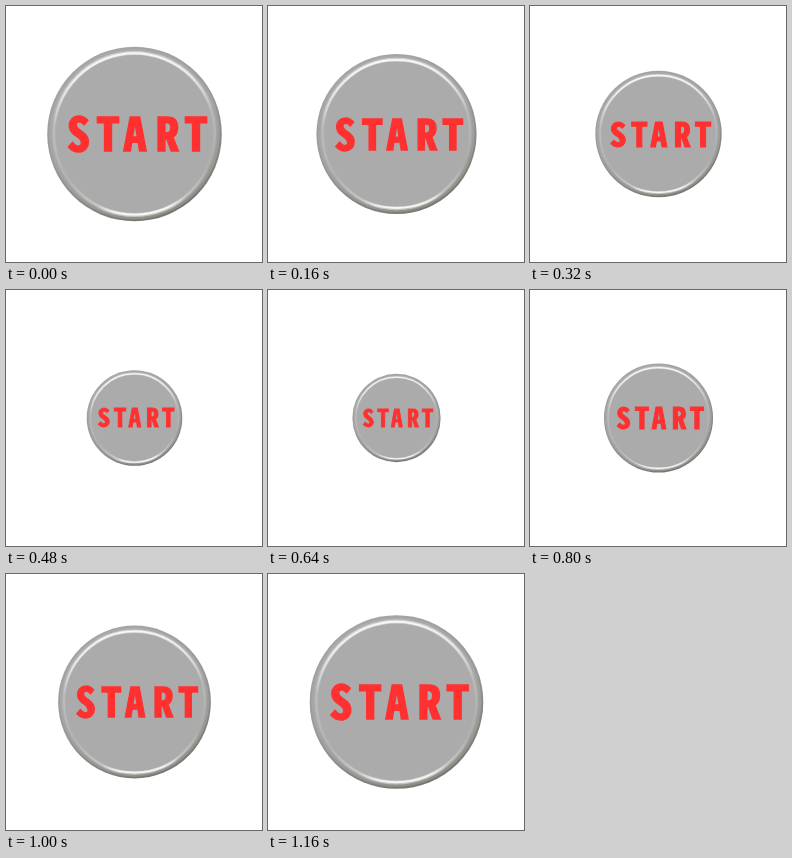
Animation of 256x256 px, one loop 1200 ms. Source, as an HTML page:

```html
<!DOCTYPE html>
<html lang="en">
<head>
<meta charset="utf-8">
<title>Start button</title>
<style>
  html, body { margin: 0; width: 100%; height: 100%; overflow: hidden; background: #fff; }
  svg { display: block; width: 100vw; height: 100vh; }
  text {
    font: 700 46px "Noto Sans Mono CJK JP", "Noto Sans Mono", monospace;
    text-anchor: middle;
    fill: #ff3030;
    stroke: #ff3030;
    stroke-width: 1.5;
  }
  .shine { fill: none; stroke: url(#shine); }
</style>
</head>
<body>
<svg viewBox="0 0 256 256">
  <defs>
    <linearGradient id="edge" x1="0.25" y1="0" x2="0.7" y2="1">
      <stop offset="0" stop-color="#a6a6a6"/>
      <stop offset="0.5" stop-color="#999"/>
      <stop offset="1" stop-color="#74746e"/>
    </linearGradient>
    <linearGradient id="rim" x1="0.25" y1="0" x2="0.65" y2="1">
      <stop offset="0" stop-color="#acacac"/>
      <stop offset="0.5" stop-color="#a4a4a4"/>
      <stop offset="0.85" stop-color="#969692"/>
      <stop offset="1" stop-color="#8e8e88"/>
    </linearGradient>
    <linearGradient id="shine" x1="0.42" y1="0" x2="0.52" y2="1">
      <stop offset="0" stop-color="#fff"/>
      <stop offset="0.18" stop-color="#fff" stop-opacity="0.75"/>
      <stop offset="0.4" stop-color="#fff" stop-opacity="0.2"/>
      <stop offset="0.75" stop-color="#fff" stop-opacity="0.15"/>
      <stop offset="0.92" stop-color="#fff" stop-opacity="0.4"/>
      <stop offset="0.98" stop-color="#fff"/>
    </linearGradient>
  </defs>
  <!-- Drawn around its own centre, at full size -->
  <g id="button">
    <circle r="87.3" fill="url(#edge)"/>
    <circle r="85.3" fill="url(#rim)"/>
    <circle r="80" fill="#ababab"/>
    <circle class="shine" r="81" stroke-width="4" opacity="0.45"/>
    <circle class="shine" r="80.7" stroke-width="2" opacity="0.85"/>
    <text x="-56 -26.5 0.5 33 61.5" y="17.3">START</text>
  </g>
</svg>
<script>
const LOOP = 1200, STEP = 40;
const button = document.getElementById("button");

function draw(now) {
  const t = Math.floor(now % LOOP / STEP) * STEP;
  const scale = 0.75 + 0.25 * Math.cos(2 * Math.PI * t / LOOP);
  button.setAttribute("transform", `translate(128.5 128) scale(${scale})`);
}

function tick() {
  draw(performance.now());
  requestAnimationFrame(tick);
}
tick();
</script>
</body>
</html>
```
